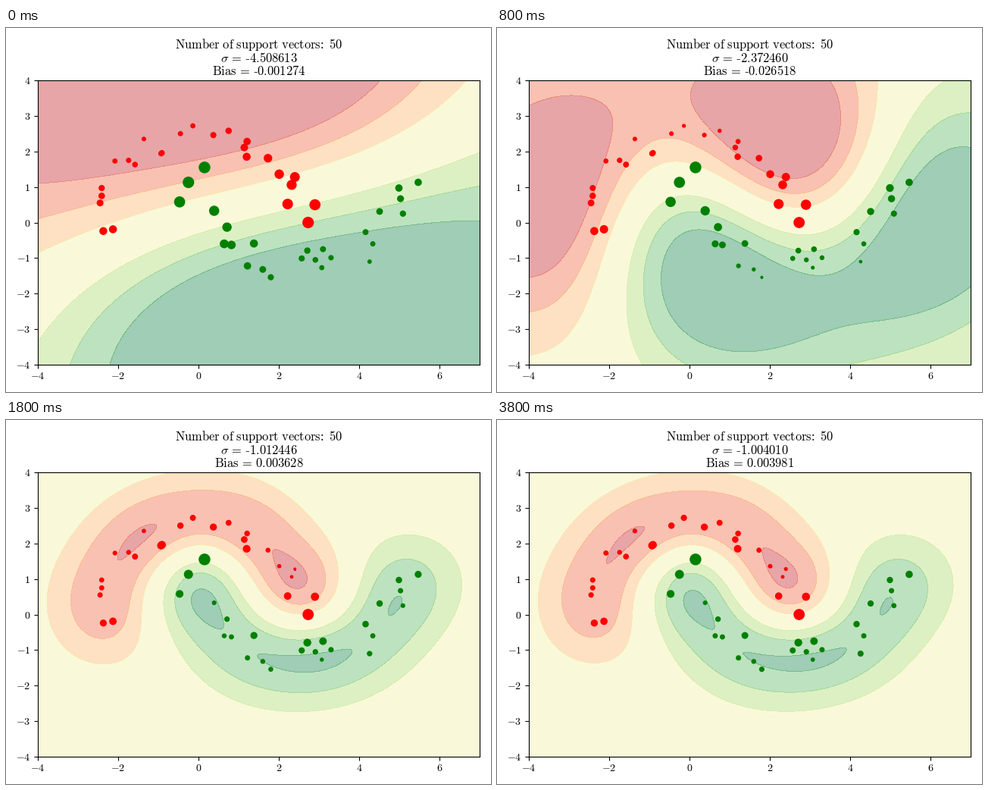
Animation, 640 px wide and 480 px high, one loop 4 s. Source, as a matplotlib script:

```python
import numpy as np
import matplotlib.pyplot as plt
from matplotlib.animation import FuncAnimation

plt.rcParams["mathtext.fontset"] = "cm"
plt.rcParams["font.family"] = "Liberation Serif"

W, H, DPI = 640, 480, 100
FRAMES, INTERVAL = 20, 200

# The two classes of the data set
RED = [
    (-2.08, 1.73), (-1.74, 1.75), (-1.58, 1.63), (-1.36, 2.35), (-0.93, 1.94),
    (-0.91, 1.96), (-0.45, 2.50), (-0.14, 2.72), (0.37, 2.46), (0.75, 2.58),
    (1.21, 2.28), (1.14, 2.11), (1.20, 1.85), (1.73, 1.81), (2.01, 1.36),
    (2.40, 1.28), (2.32, 1.06), (2.22, 0.52), (2.90, 0.50), (2.73, 0.00),
    (-2.41, 0.97), (-2.41, 0.75), (-2.45, 0.55), (-2.37, -0.24), (-2.13, -0.19)]
GREEN = [
    (-0.25, 1.13), (0.15, 1.55), (-0.47, 0.58), (0.39, 0.33), (0.71, -0.13),
    (0.64, -0.60), (0.82, -0.63), (1.38, -0.59), (1.22, -1.22), (1.60, -1.32),
    (1.80, -1.54), (2.57, -1.01), (2.71, -0.79), (2.91, -1.05), (3.10, -0.75),
    (3.30, -0.99), (3.07, -1.27), (4.16, -0.27), (4.34, -0.60), (4.26, -1.10),
    (4.51, 0.31), (4.99, 0.97), (5.03, 0.67), (5.09, 0.25), (5.47, 1.13)]
POINTS = np.array(RED + GREEN)
LABEL = np.repeat([-1.0, 1.0], [len(RED), len(GREEN)])

# Kernel width and bias at key steps of the training
KEYS = [0, 3, 5, 7, 11, 15, 19]
SIGMA = np.array([4.508613, 3.480877, 1.264042, 1.027081, 1.007028, 1.004572, 1.004010])
BIAS = [-0.001274, -0.020128, -0.032908, 0.002591, 0.004666, 0.004247, 0.003981]
SIGMA_END = 1.003843
RATE = 0.37     # training time per frame
SUBSTEPS = 4

gx, gy = np.meshgrid(np.linspace(-4, 7, 221), np.linspace(-4, 4, 161))
GRID = np.column_stack([gx.ravel(), gy.ravel()])


def sigma_at(n):
    """Steady fall at first, then exponential settling."""
    if n < 5:
        return np.interp(n, KEYS, SIGMA)
    return SIGMA_END + np.exp(np.interp(n, KEYS, np.log(SIGMA - SIGMA_END)))


def bias_at(n):
    return np.interp(n, KEYS, BIAS)


def kernel(xy, sigma):
    d2 = ((xy[:, None, :] - POINTS[None]) ** 2).sum(axis=2)
    return np.exp(-d2 / (2 * sigma ** 2))


def relax(alpha, sigma, bias, dt):
    """Gradient flow of the least-squares SVM dual over time dt."""
    q = np.outer(LABEL, LABEL) * kernel(POINTS, sigma) + np.eye(len(LABEL))
    goal = np.linalg.solve(q, 1 - bias * LABEL)
    rate, mode = np.linalg.eigh(q)
    return goal + mode @ (np.exp(-rate * dt) * (mode.T @ (alpha - goal)))


def train():
    alpha, weights = np.ones(len(LABEL)), []
    for n in range(FRAMES):
        for j in range(1, SUBSTEPS + 1):
            t = max(0, n - 1 + j / SUBSTEPS)
            alpha = relax(alpha, sigma_at(t), bias_at(t), RATE / SUBSTEPS)
        weights.append(alpha * LABEL)
    return weights


WEIGHTS = train()


def number(v):
    return ("-" if v < 0 else "") + rf"$\mathrm{{{abs(v):.6f}}}$"


def tick_label(v, _):
    return rf"$\mathrm{{{v:.0f}}}$"


cmap = plt.get_cmap("RdYlGn")
shade = [cmap((i + 0.5) / 8) for i in range(8)]
COLORS = shade[:3] + [(0.95, 0.943, 0.627)] + shade[5:]
LEVELS = np.array([-20, -3, -2, -1, 1, 2, 3, 20])

fig = plt.figure(figsize=(W / DPI, H / DPI), dpi=DPI, facecolor="white")
ax = fig.add_axes([42 / W, 36 / H, 583 / W, 375 / H])


def title_line(y, s=""):
    return fig.text(333.5 / W, 1 - y / H, s, size=11.85, ha="center", va="baseline")


title_line(27, r"$\mathrm{Number\ of\ support\ vectors}$:$\mathrm{\ \,50}$")
sigma_text = title_line(45)
bias_text = title_line(62)


def draw(n):
    sigma, bias, w = sigma_at(n), bias_at(n), WEIGHTS[n]
    field = (kernel(GRID, sigma) @ w + bias).reshape(gx.shape)
    step = 0.2 if np.abs(field).max() < 0.8 else 0.3
    size = np.abs(w) / np.abs(w).max()

    ax.clear()
    ax.contourf(gx, gy, field, levels=LEVELS * step, colors=COLORS, alpha=0.4)
    ax.scatter(*POINTS.T, s=1, c="b")
    for sign, color in ((-1, "red"), (1, "green")):
        on = (w * sign > 0) & (size > 0.004)
        ax.scatter(*POINTS[on].T, s=100 * size[on] + 2, c=color)
    ax.set(xlim=(-4, 7), ylim=(-4, 4), xticks=range(-4, 7, 2), yticks=range(-4, 5))
    ax.xaxis.set_major_formatter(tick_label)
    ax.yaxis.set_major_formatter(tick_label)
    ax.tick_params(axis="x", pad=3)
    sigma_text.set_text(r"$\sigma\,=\,$" + number(-sigma))
    bias_text.set_text(r"$\mathrm{Bias}\,=\,$" + number(bias))
    return []


anim = FuncAnimation(fig, draw, frames=FRAMES, interval=INTERVAL, repeat=True)
plt.show()
```
